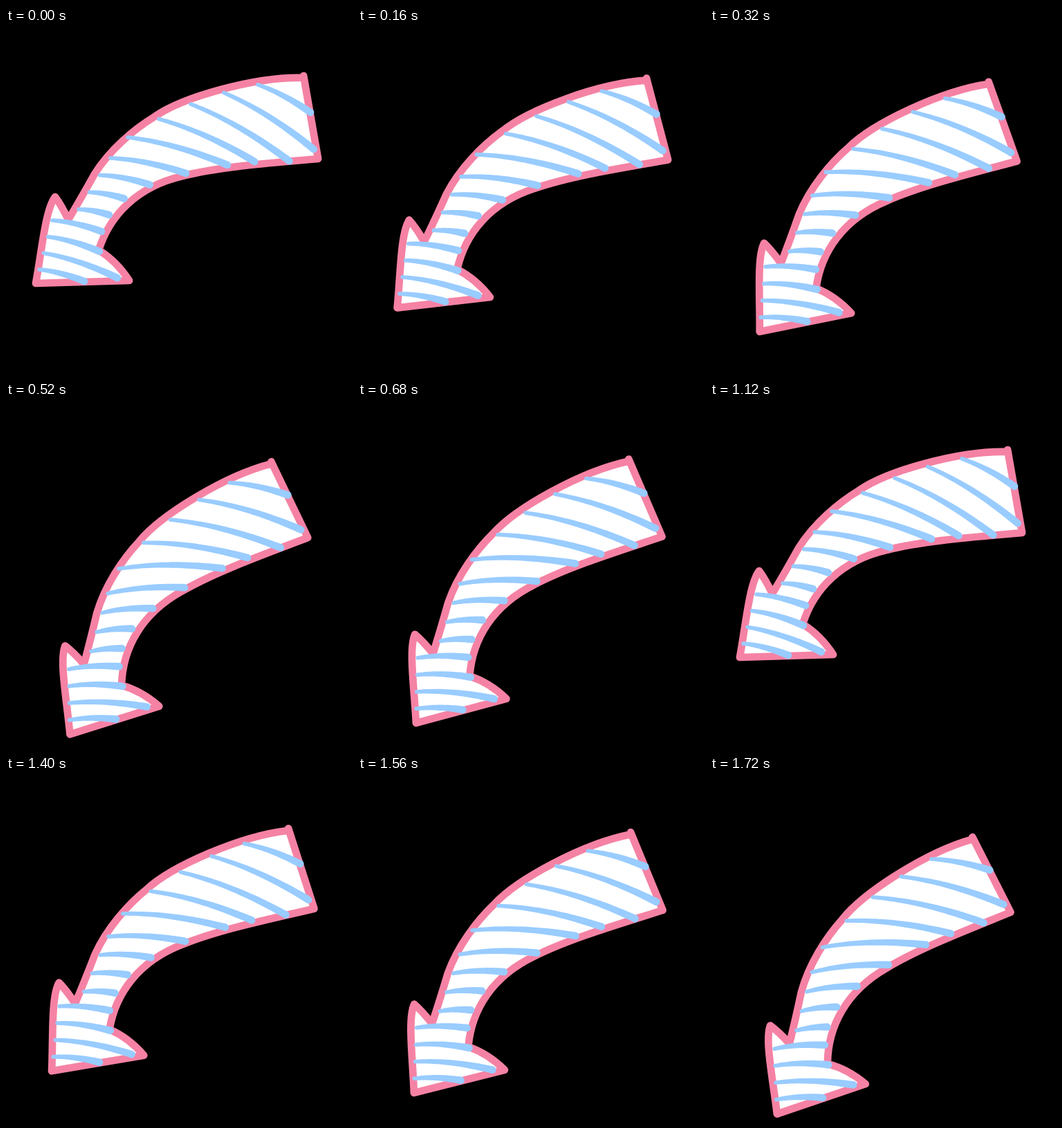
An HTML page with a canvas that plays this animation: 500x500 px, repeating every 1.96 s.

```html
<!DOCTYPE html>
<html lang="en">
<head>
<meta charset="utf-8">
<title>Swinging arrow</title>
<style>
  html, body { margin: 0; width: 100%; height: 100%; overflow: hidden; background: #000; }
  canvas { display: block; width: 100vmin; height: 100vmin; }
</style>
</head>
<body>
<canvas id="stage" width="500" height="500"></canvas>
<script>
const ctx = document.getElementById('stage').getContext('2d');
const PINK = '#f582a4', BLUE = '#99ccff';
const LOOP = 1960, STEP = 40;
const SWING = 17 * Math.PI / 180, SHIFT = [10, 64], CENTER = 250;

const arrow = new Path2D(`M90 277 Q108 247 128 211 C150 176 185 146 215 128
  C255 100 360 70 430 72 V69 Q437 108 451 189
  C385 195 310 200 255 214 C190 229 150 270 134 321
  Q160 337 178 365 L43 369 C52 320 57 262 71 244 Q80 256 90 277 Z`);

const mix = (a, b, t) => a + (b - a) * t;

// De Casteljau: returns the point at t.
function bezier(points, t) {
  while (points.length > 1) {
    points = points.slice(1).map(([x, y], i) =>
      [mix(points[i][0], x, t), mix(points[i][1], y, t)]);
  }
  return points[0];
}

// A slightly bowed stroke that widens from its start to its end.
function taperedStroke(start, end) {
  const path = new Path2D(), segments = 24, quarter = Math.PI / 2;
  const dx = end[0] - start[0], dy = end[1] - start[1], bow = 0.07;
  const bend = [start[0] + dx * 0.45 + dy * bow, start[1] + dy * 0.45 - dx * bow];
  const nodes = Array.from({ length: segments + 1 }, (_, i) => {
    const t = i / segments;
    const [ax, ay] = bezier([start, bend], t), [bx, by] = bezier([bend, end], t);
    return { x: mix(ax, bx, t), y: mix(ay, by, t), r: mix(2.8, 5.3, t),
             angle: Math.atan2(by - ay, bx - ax) };
  });
  const addSide = () => {
    for (const { x, y, r, angle } of nodes)
      path.lineTo(x + r * Math.cos(angle - quarter), y + r * Math.sin(angle - quarter));
    const { x, y, r, angle } = nodes[segments];
    path.arc(x, y, r, angle - quarter, angle + quarter);
  };
  addSide();
  nodes.reverse().forEach(node => node.angle += Math.PI);
  addSide();
  return path;
}

// Hatching runs evenly from one guide curve to another: wide end, neck, head.
function hatch(count, from, to) {
  return Array.from({ length: count }, (_, i) => {
    const t = i / (count - 1);
    return taperedStroke(bezier(from, t), bezier(to, t));
  });
}

const hatching = [
  ...hatch(5, [[364, 82], [264, 100], [176, 158]],
              [[440, 122], [484, 226], [354, 180], [320, 198]]),
  ...hatch(4, [[151, 188], [105, 262]],
              [[260, 210], [170, 232], [149, 270]]),
  ...hatch(4, [[67, 278], [48, 349]],
              [[138, 294], [86, 304], [232, 392], [113, 366]])
];

// Swing out, back, out again a little slower, then hold.
function swingAt(ms) {
  if (ms < 1120) return 1 - Math.abs(ms - 560) / 560;
  return Math.min(1, (ms - 1120) / 600);
}

function draw(time) {
  const swing = swingAt(Math.floor((time % LOOP) / STEP) * STEP);
  ctx.resetTransform();
  ctx.fillStyle = '#000';
  ctx.fillRect(0, 0, 500, 500);
  ctx.translate(CENTER + SHIFT[0] * swing, CENTER + SHIFT[1] * swing);
  ctx.rotate(-SWING * swing);
  ctx.translate(-CENTER, -CENTER);

  ctx.fillStyle = '#fff';
  ctx.fill(arrow);
  ctx.strokeStyle = PINK;
  ctx.lineWidth = 10.7;
  ctx.lineJoin = 'round';
  ctx.stroke(arrow);
  ctx.fillStyle = BLUE;
  hatching.forEach(stroke => ctx.fill(stroke));
}

const startTime = performance.now();
function tick() {
  draw(performance.now() - startTime);
  requestAnimationFrame(tick);
}
tick();
</script>
</body>
</html>
```
